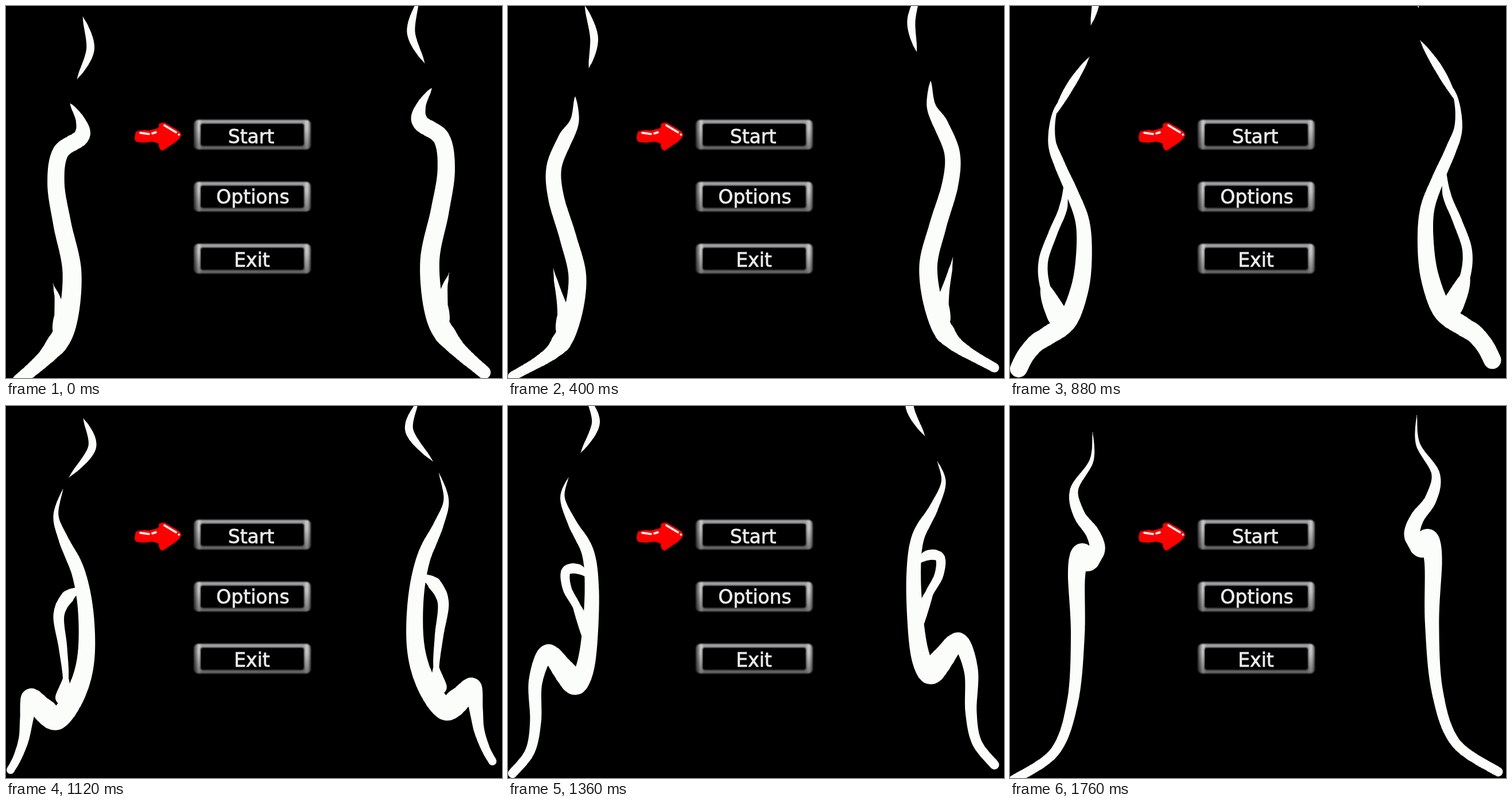
These frames come from a looping animation (864 by 648 pixels, 1840 ms). An HTML page:

```html
<!DOCTYPE html>
<html lang="en">
<head>
<meta charset="utf-8">
<title>Menu</title>
<style>
html, body { margin: 0; width: 100%; height: 100%; overflow: hidden; background: #000; }
svg { display: block; width: 100vw; height: 100vh; }
text { font: 33px "DejaVu Sans", sans-serif; fill: #ebebeb; stroke: #ebebeb; stroke-width: .8; text-anchor: middle; }
</style>
</head>
<body>
<svg viewBox="0 0 864 648">
  <defs>
    <linearGradient id="metal">
      <stop offset="0" stop-color="#3a3a3a"/>
      <stop offset=".02" stop-color="#777"/>
      <stop offset=".045" stop-color="#d4d4d4"/>
      <stop offset=".07" stop-color="#a2a0a4"/>
      <stop offset=".94" stop-color="#a2a0a4"/>
      <stop offset=".97" stop-color="#d0d0d0"/>
      <stop offset="1" stop-color="#555"/>
    </linearGradient>
    <linearGradient id="shade" x1="0" y1="0" x2="0" y2="1">
      <stop offset=".3" stop-opacity="0"/>
      <stop offset="1" stop-opacity=".4"/>
    </linearGradient>
    <filter id="soft"><feGaussianBlur stdDeviation=".8"/></filter>
    <g id="button" filter="url(#soft)">
      <rect id="plate" x="327" y="198.500" width="204" height="51" rx="8" fill="url(#metal)"/>
      <use href="#plate" style="fill:url(#shade)"/>
      <rect x="327" y="198.500" width="204" height="51" rx="8" fill="url(#shade)"/>
      <rect x="338" y="204" width="182" height="40.500" rx="5" fill="#000"/>
    </g>
  </defs>
  <rect width="864" height="648" fill="#000"/>
  <path id="flame" fill="#fbfdfa"/>
  <use href="#flame" transform="matrix(-1.02 0 0 1.025 855.5 -31)"/>
  <use href="#button"/>
  <use href="#button" y="108"/>
  <use href="#button" y="216"/>
  <text x="427" y="238.500">Start</text>
  <text x="430" y="343.500">Options</text>
  <text x="428.500" y="454">Exit</text>
  <path fill="#fe0000" d="M226 219Q236 215 249 217L264 213Q268 211 266 206Q271 202 278 204L300 217Q306 222 305 226Q300 235 288 242L273 252Q266 251 266 240Q256 235 249 237Q238 239 229 237Q224 236 224 229Z"/>
  <path fill="none" stroke="#fff" stroke-width="3.500" stroke-linecap="round" d="M234 221L249 223M255 222L261 220M276 208L296 220M301 224h.1"/>
</svg>
<script>
const LOOP = 1840, STEP = 80;
const SPLIT = 880, FREE = 1120;

// Poses: time -> radii "top,belly,foot", then the centre line from tip to foot.
const oldStem = { peak: .85, from: 0, until: SPLIT, poses: {
  0: "13,18,11 112,170 130,200 131,228 95,255 87,310 98,380 115,465 105,555 75,605 22,653",
  400: "12,17,8 117,158 116,200 98,235 80,282 84,335 105,405 121,475 108,552 78,602 8,645",
  640: "6,20,11 116,146 96,177 79,218 75,265 85,315 110,370 128,450 117,535 82,592 14,636",
  880: "6.5,18,15 138,89 121,124 89,161 72,215 88,278 112,340 129,420 114,520 62,578 15,630"
} };
const newStem = { peak: .6, from: SPLIT, until: LOOP, poses: {
  880: "7,17,15 100,146 78,185 73,235 86,275 108,325 126,375 129,430 122,490 100,548 66,574 48,585 36,597 25,612 15,632",
  1120: "9,21,7 99,145 87,190 100,232 126,290 139,360 139,440 122,500 90,544 64,528 42,508 36,545 31,580 20,612 8,634",
  1360: "8,20,8 105,125 95,160 112,204 139,255 146,320 142,405 133,460 117,485 97,460 68,431 48,480 48,550 38,602 8,640",
  1680: "7,20,8 144,46 142,95 112,145 120,188 143,220 152,246 144,262 135,270 124,260 116,295 118,400 109,515 78,602 5,652"
} };
const branch = { peak: .8, from: 0, until: LOOP, poses: {
  0: "1,11,16 82,484 85,494 89,506 92,522 95,542 97,562",
  400: "2,11,16 79,458 83,478 88,498 93,518 97,540 99,562",
  640: "4,10,15 77,380 70,415 75,457 87,500 96,530 99,555",
  880: "7,9,18 97,300 93,350 75,395 58,445 62,492 83,540",
  1120: "12,5,12 130,318 107,333 92,365 99,420 104,475 98,508",
  1360: "9,7,11 145,300 122,284 101,288 103,318 120,350 138,395",
  1680: "9,9,9 146,250 136,252 128,258 130,266 136,270 142,266"
} };
const ribbons = [oldStem, newStem, branch];

const parse = s => s.split(" ").map(p => p.split(",").map(Number));
const mix = (a, b, u) => a + (b - a) * u;
const blend = (a, b, u) => a.map((p, i) => p.map((v, k) => mix(v, b[i][k], u)));

for (const r of ribbons) r.keys = Object.entries(r.poses).map(([t, s]) => [+t, parse(s)]);

function pose(keys, t) {
  const i = keys.findIndex(k => k[0] > t);
  if (i < 0) return keys[keys.length - 1][1];
  const [t0, a] = keys[i - 1], [t1, b] = keys[i];
  return blend(a, b, (t - t0) / (t1 - t0));
}

const spline = (a, b, c, d, u) =>
  b + u / 2 * (c - a + u * (2 * a - 5 * b + 4 * c - d + u * (3 * (b - c) + d - a)));

function disc(x, y, r) {
  const f = v => v.toFixed(2);
  return `M${f(x - r)} ${f(y)}a${f(r)} ${f(r)} 0 1 0 ${f(2 * r)} 0a${f(r)} ${f(r)} 0 1 0 ${f(-2 * r)} 0`;
}

// The union of discs strung along the spline through pts.
function trace(pts, radius) {
  const last = pts.length - 1;
  const at = i => pts[Math.max(0, Math.min(last, i))];
  let d = "";
  for (let i = 0; i < last; i++) {
    const [a, b, c, e] = [at(i - 1), at(i), at(i + 1), at(i + 2)];
    const n = Math.ceil(Math.hypot(c[0] - b[0], c[1] - b[1]) / 1.6) + 1;
    for (let k = 0; k <= n; k++) {
      const [x, y] = b.map((v, j) => spline(a[j], v, c[j], e[j], k / n));
      d += disc(x, y, Math.max(.5, radius((i + k / n) / last)));
    }
  }
  return d;
}

// Sharp tip, swelling to the belly, thinning again to the foot.
const swell = (top, belly, foot, peak) => u =>
  Math.min(1, u / .2) ** .8 * (u < peak
    ? mix(top, belly, (u / peak) ** 1.5)
    : mix(foot, belly, ((1 - u) / (1 - peak)) ** 2));

const crescent = pts => trace(pts, u => 7 * Math.sin(Math.PI * u));

// A loose wisp straightens and accelerates upwards.
function rise([tip, mid, end], age, life) {
  const lift = 94 * (age / life) ** 2, k = Math.min(1, age / life / .45);
  return [[tip[0], tip[1] - lift], [mid[0] + 3 * k, mid[1] - lift], [end[0] + 17 * k, end[1] - lift]];
}

const oldWisp = parse("134,19 147,75 124,127");
const stemTop = parse("138,89 104,141 74,195");
const newWisp = parse("135,22 150,72 110,124");

function wisps(t) {
  let d = crescent(rise(oldWisp, t, 880));
  if (t >= FREE) d += crescent(rise(newWisp, t - FREE, 355));
  else if (t >= SPLIT) d += crescent(blend(stemTop, newWisp, (t - SPLIT) / (FREE - SPLIT)));
  return d;
}

const flame = document.getElementById("flame");

function draw(t) {
  let d = wisps(t);
  for (const { peak, from, until, keys } of ribbons) {
    if (t < from || t >= until) continue;
    const [radii, ...line] = pose(keys, t);
    d += trace(line, swell(...radii, peak));
  }
  flame.setAttribute("d", d);
}

const start = performance.now();
let shown = -1;
function tick() {
  const t = Math.floor((performance.now() - start) % LOOP / STEP) * STEP;
  if (t !== shown) draw(shown = t);
  requestAnimationFrame(tick);
}
tick();
</script>
</body>
</html>
```
